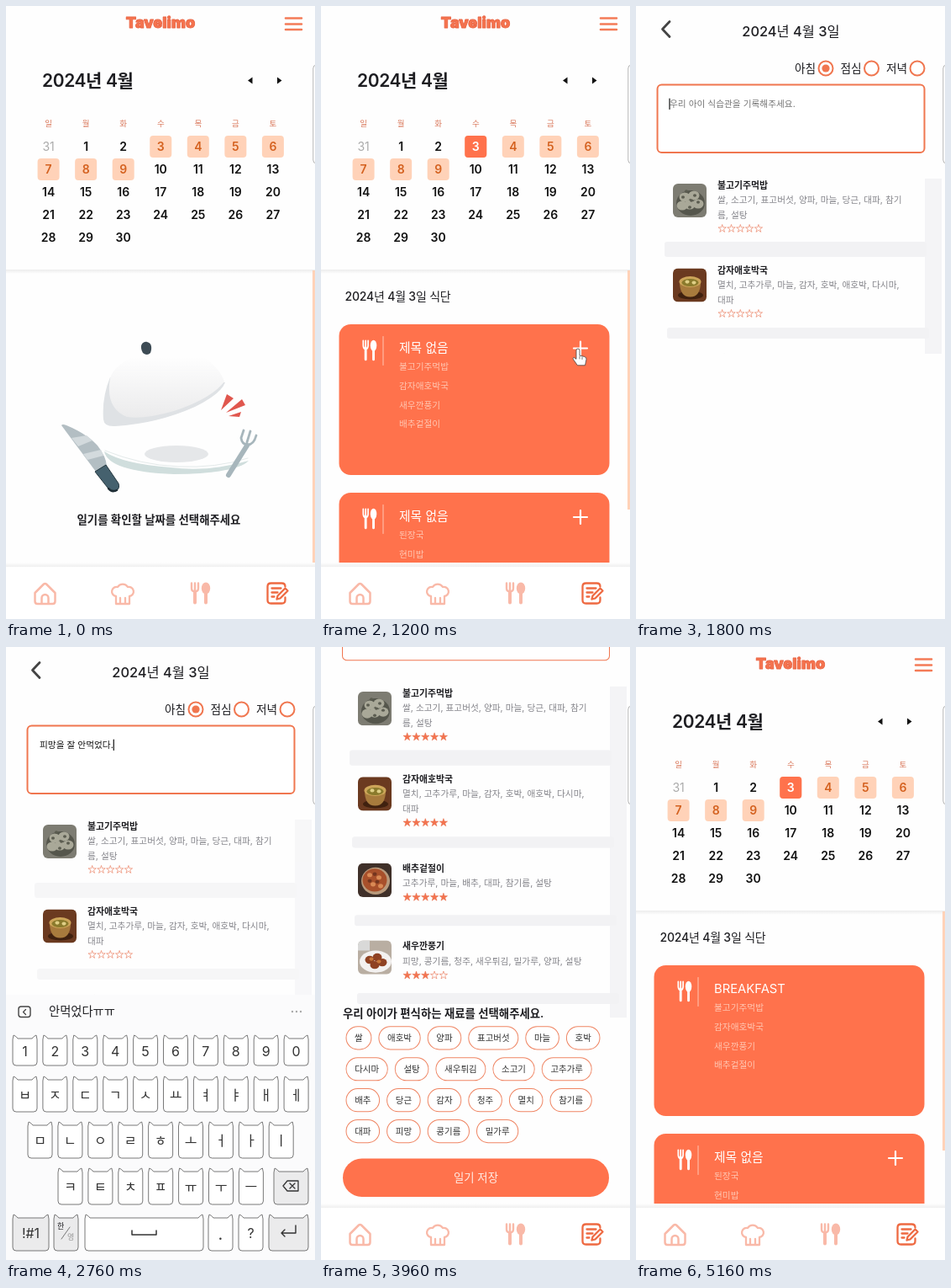
Write an HTML page that moves like this. It is 368 by 728 pixels and loops after 5280 ms.

```html
<!DOCTYPE html>
<html lang="ko">
<meta charset="utf-8">
<title>식단 일기</title>
<style>
html, body { margin: 0; width: 100%; height: 100%; overflow: hidden; background: #fefefe }
svg { display: block; width: 368px; height: 728px; font-family: Inter, "Noto Sans CJK KR", "Noto Sans CJK", sans-serif }
text { white-space: pre }
</style>
<body>
<script>
const CORAL = '#ff724c', LINE = '#f0764f', PEACH = '#ffd2b8', INK = '#1e1e22', PALE = '#f9b9a8';
const LOOP = 5280, STEP = 120, MAX_SCROLL = 153;
const MEMO = '피망을 잘 안먹었다.';

// Small SVG builders. Text is placed by its vertical centre.
const text = (x, cy, s, size, fill = INK, weight = 400, anchor = 'start', extra = '') =>
  `<text x="${x}" y="${cy + size * .36}" font-size="${size}" fill="${fill}" font-weight="${weight}" text-anchor="${anchor}" ${extra}>${s}</text>`;
const mid = (x, cy, s, size, fill, weight, extra) => text(x, cy, s, size, fill, weight, 'middle', extra);
const rect = (x, y, w, h, r, fill, extra = '') =>
  `<rect x="${x}" y="${y}" width="${w}" height="${h}" rx="${r}" fill="${fill}" ${extra}/>`;
const oval = (x, y, rx, ry, fill, extra = '') =>
  `<ellipse cx="${x}" cy="${y}" rx="${rx}" ry="${ry}" fill="${fill}" ${extra}/>`;
const shape = (d, fill, extra = '') => `<path d="${d}" fill="${fill}" ${extra}/>`;
const line = (d, color, w = 1, extra = '') =>
  `<path d="${d}" fill="none" stroke="${color}" stroke-width="${w}" stroke-linecap="round" stroke-linejoin="round" ${extra}/>`;
const at = (x, y, body, more = '') => `<g transform="translate(${x} ${y}) ${more}">${body}</g>`;
const group = (id, body) => `<g id="${id}">${body}</g>`;

const cutlery = color =>
  line('M-10-12v6q0 4 4 4t4-4v-6M-6-12v9', color, 2.4) + line('M-6-1v12M7 0v11', color, 4) + oval(7, -6, 5.2, 7, color);

// Calendar
function day(n) {
  const x = 50.6 + n % 7 * 44.55, y = 167 + Math.floor(n / 7) * 27;
  const marked = n > 2 && n < 10;
  return (marked ? rect(x - 13, y - 13, 26, 26, 4, PEACH) : '') +
    mid(x, y, n || 31, 14, marked ? '#d4611f' : n ? '#111' : '#aaa', n ? 600 : 400);
}
function calendar() {
  let s = mid(184, 19.5, 'Tavelimo', 18, '#f5744f', 900, 'stroke="#ea6443" stroke-width=".9" stroke-linejoin="round"') +
    line('M333 14.5h19M333 21.5h19M333 28h19', '#f47b57', 2.6) +
    text(43, 88.5, '2024년 4월', 21, INK, 600, 'start', 'letter-spacing="-.4"') +
    shape('M288 88.5l5.5-4v8zM328.5 88.5l-5.5-4v8z', '#111');
  [...'일월화수목금토'].forEach((c, i) => s += mid(50.6 + i * 44.55, 140, c, 9.5, '#d9775a'));
  for (let n = 0; n <= 30; n++) s += day(n);
  return s + rect(0, 313, 368, 5, 0, 'url(#shade)');
}
const cloche = () =>
  shape('M117 529Q122 553 200 556Q275 555 289 540Q240 554 196 548Q140 544 117 529z', '#d0dedd') +
  line('M118 528Q160 545 205 547T288 537', '#e4eaea', 1) +
  oval(203, 532, 38, 10, '#e5e7e9') +
  shape('M124 441Q114 465 116 491Q117 500 130 499Q180 496 225 476Q256 461 261 447L240 445z', '#dfe2e5') +
  shape('M124 442C136 405 222 400 240 420Q256 433 260 446Q245 466 200 481Q165 491 144 488Q118 478 124 442z', 'url(#dome)') +
  shape('M163 412C158 403 163 398 168 399C174 400 174 407 172 412Q168 416 163 412z', '#3d4b54') +
  shape('M256 480L263 461L271 466zM262 483L281 467L285 474zM265 487L280 482L278 488z', '#e0574e') +
  shape('M66 498Q67 496 72 498Q96 508 109 522Q119 535 120 546L107 553z', '#b3bec3') +
  shape('M78 513L96 510L103 516L86 523zM92 532L113 527L116 534L97 539z', '#d3dadd') +
  shape('M106 553L119 545L134 567Q136 573 131 576Q125 578 121 572z', '#45616e', 'stroke="#263840"') +
  line('M122 573Q126 578 132 575', '#1d2c34', 2.5) +
  line('M265 557L287 522', '#a7b6bc', 6) +
  line('M283 504L280 513Q281 521 288 521Q295 521 298 510M291 505L287 518', '#a7b6bc', 2.8) +
  mid(182, 610, '일기를 확인할 날짜를 선택해주세요', 13.4, INK, 600);

function mealCard(y, title, items, extra = '') {
  return rect(21.5, y, 322, 179, 14, CORAL) + at(57.5, y + 31, cutlery('#fff'), 'scale(.72 .95)') +
    line(`M74 ${y + 14.5}v34`, '#ffc6b3', 1) + text(93, y + 28, title, 14.8, '#fff') +
    items.map((item, i) => text(93, y + 50.5 + i * 22.6, item, 10.7, '#ffc6b2', 300)).join('') + extra;
}
const plus = (id, y) => line(`M301 ${y}h16M309 ${y - 8}v16`, '#fff', 2.2, `id="${id}"`);
const meals = () =>
  mealCard(378, '<tspan id="mealTitle"></tspan>', ['불고기주먹밥', '감자애호박국', '새우깐풍기', '배추겉절이'], plus('addFirst', 406.5)) +
  mealCard(578, '제목 없음', ['된장국', '현미밥', '김치'], plus('addSecond', 607));

// Diary form
const blobs = (color, r, points) => points.map(([x, y]) => oval(x, y, r, r * .85, color)).join('');
const photos = [
  rect(0, 0, 40, 40, 0, '#7d7c72') + oval(21, 23, 17, 15, '#55564c') +
    blobs('#a9a898', 6.5, [[14, 16], [25, 14], [20, 25], [30, 24], [11, 26]]) +
    blobs('#5b5c50', 2, [[12, 16], [26, 14], [20, 28], [30, 22], [16, 9], [22, 20]]),
  rect(0, 0, 40, 40, 0, '#6b3a20') + oval(21, 32, 15, 5, '#40210f') + shape('M8 16h25q0 18-12.5 18T8 16z', '#a87b3d') +
    oval(20.5, 16, 13, 6.5, '#cda559') + oval(20.5, 17, 10, 4.5, '#8a7a2c') + blobs('#dfcf86', 2.5, [[17, 16], [25, 17]]),
  rect(0, 0, 40, 40, 0, '#3f3029') + oval(21, 21, 17, 16, '#b99a7c') + oval(20, 20, 14.5, 13.5, '#a8502b') +
    blobs('#d98a55', 3, [[14, 14], [25, 17], [18, 25], [27, 27]]) + blobs('#74351f', 2.5, [[20, 13], [14, 21], [23, 22]]),
  rect(0, 0, 40, 40, 0, '#b9aea2') + rect(0, 0, 14, 12, 0, '#d9d9d8') + oval(21, 25, 19, 13, '#f3f1f0') +
    blobs('#8f4223', 5.5, [[14, 23], [23, 20], [29, 26], [20, 29]]) + blobs('#c8773a', 2.5, [[16, 22], [25, 25]])
];
const dishes = [
  [213, 211, 5, '불고기주먹밥', '쌀, 소고기, 표고버섯, 양파, 마늘, 당근, 대파, 참기', '름, 설탕'],
  [314, 311.5, 5, '감자애호박국', '멸치, 고추가루, 마늘, 감자, 호박, 애호박, 다시마,', '대파'],
  [419, 413, 5, '배추겉절이', '고추가루, 마늘, 배추, 대파, 참기름, 설탕'],
  [511, 504, 3, '새우깐풍기', '피망, 콩기름, 청주, 새우튀김, 밀가루, 양파, 설탕']
];
function star(cx, cy) {
  const points = Array.from({ length: 10 }, (_, i) => {
    const r = i % 2 ? 1.9 : 4.9, a = i * Math.PI / 5;
    return `${cx + r * Math.sin(a)},${cy - r * Math.cos(a)}`;
  });
  return `<polygon points="${points.join(' ')}" stroke="#e8714f" stroke-width=".6"/>`;
}
function dish([y, photoY, score, name, ...desc], i) {
  let stars = '';
  for (let k = 0; k < 5; k++) stars += star(102.7 + k * 10.8, y + 17 + desc.length * 17.2);
  return at(44, photoY, `<g clip-path="url(#photo)">${photos[i]}</g>`) + text(97, y, name, 10.9, INK, 600) +
    desc.map((d, k) => text(97, y + 17.3 + k * 17.5, d, 10.7, '#85858b')).join('') + `<g class="stars">${stars}</g>`;
}
const chipRows = ['쌀 애호박 양파 표고버섯 마늘 호박', '다시마 설탕 새우튀김 소고기 고추가루',
  '배추 당근 감자 청주 멸치 참기름', '대파 피망 콩기름 밀가루'];
function chips() {
  return chipRows.map((row, r) => {
    let x = 30;
    const y = 619 + r * 36.6;
    return row.split(' ').map(name => {
      const w = 20.2 + 9.7 * name.length, left = x;
      x += w + 9;
      return `<g${name === '피망' ? ' id="pick"' : ''}>` + rect(left, y - 13.5, w, 27, 13.5, '#fff', 'stroke="#ef8563"') +
        mid(left + w / 2, y, name, 10.5, '#333') + '</g>';
    }).join('');
  }).join('');
}
const radio = (x, label, on) => text(x, 74, label, 13.7) +
  oval(x + 37, 74, 8.5, 8.5, '#fff', `stroke="${LINE}" stroke-width="2"`) + (on ? oval(x + 37, 74, 4.6, 4.6, LINE) : '');
const shadows = () => rect(344, 205, 20, 390, 0, '#f4f4f6') +
  [280, 382, 474, 566].map((y, i) => rect(34 + i * 3, y, 312, i ? 13 : 18, 3, '#f2f2f4')).join('');
const diary = () => group('shadows', shadows()) +
  line('M40 18.5L31.5 27.5L40 36.5', '#444', 2.8) + mid(184.5, 30, '2024년 4월 3일', 16.4, INK, 500) +
  radio(189, '아침', true) + radio(243.5, '점심') + radio(298, '저녁') +
  rect(25.5, 93.5, 318, 80.5, 5, '#fff', `id="box" stroke="${LINE}"`) +
  text(40, 116, '', 10.7, INK, 400, 'start', 'id="memo"') + line('M0 110v12.5', '#111', 1.2, 'id="caret"') +
  dishes.map(dish).join('') +
  text(26, 590, '우리 아이가 편식하는 재료를 선택해주세요.', 13.4, INK, 600) + chips() +
  rect(26, 761, 317, 45, 22.5, CORAL) + mid(184.5, 783, '일기 저장', 13.4, '#ffece5', 300);

// Keyboard with cat-eared keys
const key = (x, y, w, h, label = '', fill = '#fff', size = 16) =>
  shape(`M${x} ${y + 5}l1-5q3 1 5 4h${w - 12}q2-3 5-4l1 5v${h - 9}q0 4-4 4h${8 - w}q-4 0-4-4z`, fill, 'stroke="#6a6a6a" stroke-width=".9"') +
  mid(x + w / 2, y + h / 2 + 1, label, size, '#333', 400);
function keyboard() {
  const rows = [['1234567890', 8, 461, 36], ['ㅂㅈㄷㄱㅅㅛㅕㅑㅐㅔ', 8, 510, 42],
    ['ㅁㄴㅇㄹㅎㅗㅓㅏㅣ', 26, 564, 43], ['ㅋㅌㅊㅍㅠㅜㅡ', 62, 619, 43]];
  const grey = '#ebebec';
  return rect(0, 413, 368, 315, 0, '#fbfbfc') +
    rect(15, 427, 14, 12.5, 3, 'none', 'stroke="#444" stroke-width="1.4"') + line('M23.5 430.5l-3 3 3 3', '#444', 1.3) +
    text(51, 433, '', 14.3, INK, 400, 'start', 'id="hint"') +
    [341, 346, 351].map(x => oval(x, 433, 1.2, 1.2, '#aaa')).join('') +
    rows.map(([chars, x, y, h]) => [...chars].map((c, i) => key(x + i * 35.9, y, 29, h, c)).join('')).join('') +
    key(319, 619, 41, 43, '', grey) + line('M330 640l5-6h13v12h-13zM338 637l6 6M344 637l-6 6', '#333', 1.3) +
    key(8, 674, 43, 43, '!#1', grey) + key(57, 674, 29, 43, '', grey) +
    text(61, 688, '한', 9) + text(73, 701, '영', 9, '#999') + line('M66 703l10-14', '#777', 1) +
    key(94, 674, 141, 43) + line('M150 693v5h29v-5', '#333', 1.5) +
    key(241, 674, 29, 43, '.', '#fff', 20) + key(277, 674, 29, 43, '?') +
    key(313, 674, 47, 43, '', grey) + line('M345 687v9h-17M332 692l-4 4 4 4', '#333', 1.4);
}

const nav = () => rect(0, 661, 368, 6, 0, 'url(#shade)', 'transform="matrix(1 0 0 -1 0 1328)"') + rect(0, 666, 368, 62, 0, '#fff') +
  at(46.5, 698, line('M-12-1L-2-11Q0-13 2-11L12-1V9q0 3-3 3H-9q-3 0-3-3zM-4 12V5a4 4 0 0 1 8 0v7', PALE, 2.5)) +
  at(139, 698, line('M-8 3A5.6 5.6 0 1 1-6-8A7 7 0 0 1 6-8A5.6 5.6 0 1 1 8 3V12H-8zM-3 5v6M3 5v6', PALE, 2.3)) +
  at(231, 697.5, cutlery(PALE)) +
  at(322.5, 697.5, line('M10 5v3q0 4-4 4H-7q-4 0-4-4V-8q0-4 4-4H6q4 0 4 4M-6-6H5M-6-1H1M-6 4h3M0 7l1-4 9-9 3 3-9 9z', '#ee6a42', 2.3));

const hand = shape('M-2 1a2 2 0 0 1 4 0v6l5.5 1.4q3 .8 2.5 3.4l-1.5 7h-9l-5-7q-1.2-2 .6-2.5l2.9 2z', '#fff', 'stroke="#444" stroke-width=".8"') +
  line('M2 8v3M5 9v2.5', '#444', .7);

document.body.innerHTML = `<svg viewBox="0 0 368 728">
<defs>
<linearGradient id="shade" x2="0" y2="1"><stop stop-color="#ececec"/><stop offset="1" stop-color="#fefefe"/></linearGradient>
<linearGradient id="dome" x2="0" y2="1"><stop offset=".1" stop-color="#fefefe"/><stop offset="1" stop-color="#ebebec"/></linearGradient>
<clipPath id="photo"><rect width="40" height="40" rx="6"/></clipPath>
</defs>
${rect(0, 0, 368, 728, 0, '#fefefe')}
${group('home', calendar() + group('empty', cloche()) +
  group('picked', rect(171.25, 154, 26, 26, 4, CORAL) + mid(184.25, 167, '3', 14, '#fff', 600) +
    text(28.5, 345, '2024년 4월 3일 식단', 14, INK, 500, 'start', 'letter-spacing="-.2"')) +
  group('meals', meals()) + rect(365, 314, 3, 351, 0, PEACH, 'id="thumb"'))}
${group('diary', diary())}
${nav()}
${rect(0, 413, 368, 315, 0, '#fefefe', 'id="blank"')}
${group('keys', keyboard())}
${rect(365.8, 70, 10, 117, 4, '#fff', 'stroke="#b5b5b5"')}
${group('cursor', hand)}
</svg>`;

const $ = id => document.getElementById(id);
const show = (id, on) => $(id).style.display = on ? '' : 'none';
const within = (t, a, b) => t >= a && t < b;
const progress = (t, a, b) => Math.min(1, Math.max(0, (t - a) / (b - a)));
const starRows = [...document.querySelectorAll('.stars')];

// Every state of the memo while Hangul syllables are composed.
const typed = [''];
[...MEMO].forEach((c, i) => {
  const before = MEMO.slice(0, i), code = c.charCodeAt(0) - 0xAC00;
  if (code >= 0) {
    typed.push(before + 'ㄱㄲㄴㄷㄸㄹㅁㅂㅃㅅㅆㅇㅈㅉㅊㅋㅌㅍㅎ'[Math.floor(code / 588)]);
    if (code % 28) typed.push(before + String.fromCharCode(0xAC00 + code - code % 28));
  }
  typed.push(before + c);
});

// Taps: from, to, x, y of the fingertip
const taps = [[240, 600, 184, 172], [960, 1320, 306, 408], [1440, 1680, 70, 117],
  [4200, 4440, 98, 577], [4560, 4800, 252, 632]];

function draw(t) {
  const onDiary = within(t, 1320, 4800), picked = t >= 480, saved = t >= 4800;
  const typing = within(t, 1800, 2880), keysUp = within(t, 1920, 2880), focused = within(t, 1680, 2880);
  show('home', !onDiary);
  show('diary', onDiary);
  show('empty', !picked);
  show('picked', picked);
  show('meals', t >= 720);
  show('addFirst', !saved);
  $('mealTitle').textContent = saved ? 'BREAKFAST' : '제목 없음';
  $('thumb').setAttribute('height', t >= 720 ? 284 : 351);

  const memo = typed[Math.round(progress(t, 1920, 2640) * (typed.length - 1))];
  $('memo').textContent = memo || '우리 아이 식습관을 기록해주세요.';
  $('memo').setAttribute('fill', memo ? '#111' : '#757575');
  $('hint').textContent = t >= 2640 ? '안먹었다ㅠㅠ' : memo.split(' ').pop();
  show('blank', typing);
  show('keys', keysUp);
  show('caret', focused);
  $('box').setAttribute('stroke-width', focused ? 2 : 1);
  $('shadows').setAttribute('opacity', keysUp ? .6 : 1);
  const caretX = 40 + (memo && onDiary ? $('memo').getComputedTextLength() + .5 : 0);
  $('caret').setAttribute('transform', `translate(${caretX} 0)`);

  starRows.forEach((row, i) => [...row.children].forEach((s, k) =>
    s.setAttribute('fill', t >= 3120 + i * STEP && k < dishes[i][2] ? '#f4734e' : '#fff')));
  const [pill, label] = $('pick').children;
  pill.setAttribute('fill', t >= 4320 ? CORAL : '#fff');
  label.setAttribute('fill', t >= 4320 ? '#fff' : '#333');

  // Scroll to the end, then a short overscroll stretch.
  const p = progress(t, 3600, 3840), scroll = MAX_SCROLL * p * p * (3 - 2 * p);
  const stretch = 1 + .0083 * Math.sin(Math.PI * progress(t, 3840, 4080));
  $('diary').setAttribute('transform', `translate(0 ${666 * (1 - stretch)}) scale(1 ${stretch}) translate(0 ${-scroll})`);

  const tap = taps.find(([a, b]) => within(t, a, b));
  show('cursor', tap);
  if (tap) $('cursor').setAttribute('transform', `translate(${tap[2]} ${tap[3]})`);
}

const start = performance.now();
function tick() {
  const t = (performance.now() - start) % LOOP;
  draw(Math.floor(t / STEP) * STEP);
  requestAnimationFrame(tick);
}
tick();
</script>
</body>
</html>
```
